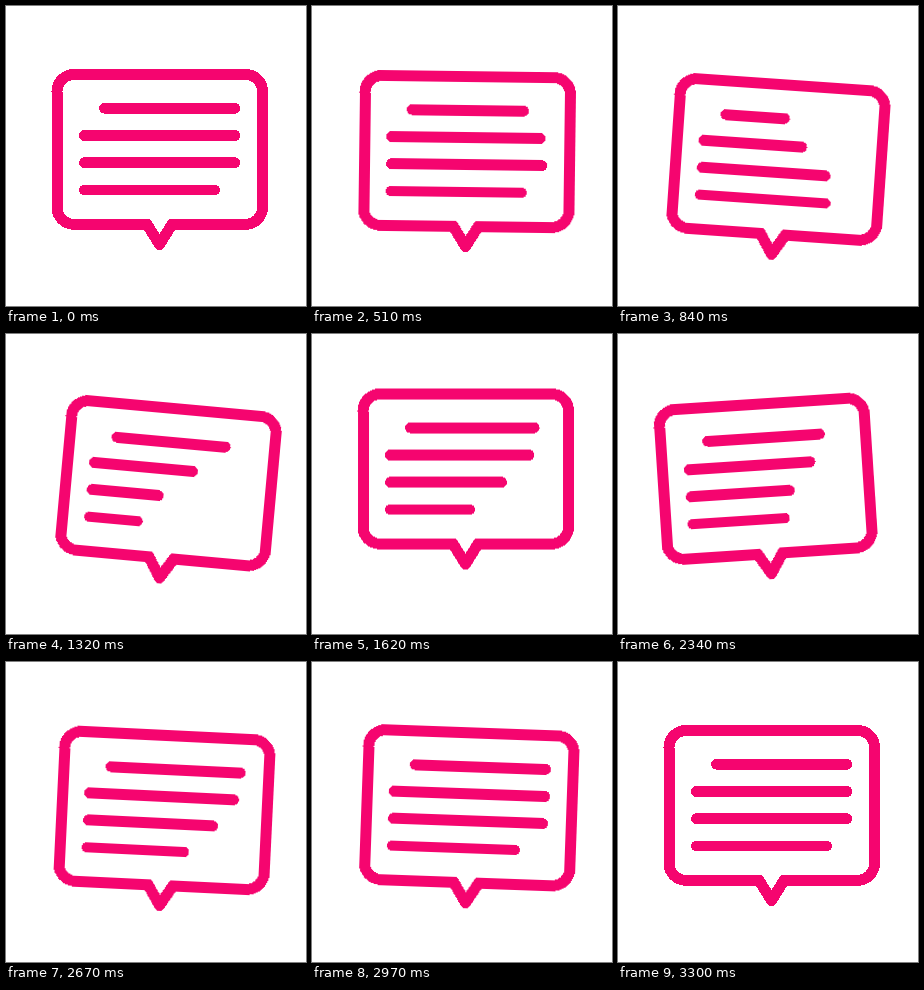
Recreate the animation shown at these times as an HTML page without scripts. Size 300x300 px, loop 3.6 s.

```html
<!DOCTYPE html>
<html lang="en">
<head>
<meta charset="utf-8">
<title>Speech bubble</title>
<style>
  html, body { margin: 0; width: 100%; height: 100%; overflow: hidden; background: #fff; }
  svg { display: block; width: 100vw; height: 100vh; shape-rendering: crispEdges; }

  .bob, .tilt, .text path {
    animation: 3.6s cubic-bezier(.37, 0, .63, 1) infinite;
  }
  .bob { animation-name: bob; }
  .tilt { animation-name: tilt; transform-origin: 153.5px 238.5px; }

  .ink { fill: none; stroke: #f5056f; stroke-width: 11; stroke-linecap: round; stroke-linejoin: round; }

  /* a growing dash offset pulls the right end of a line inwards */
  .text path { stroke-width: 10.8; }
  .text path:nth-child(1) { stroke-dasharray: 130.5 400; animation-name: line1; }
  .text path:nth-child(2) { stroke-dasharray: 150.5 400; animation-name: line2; }
  .text path:nth-child(3) { stroke-dasharray: 150.5 400; animation-name: line3; }
  .text path:nth-child(4) { stroke-dasharray: 130 400; animation-name: line4; }

  @keyframes bob {
    0%, 8.6% { transform: translateY(0); }
    29.3% { transform: translateY(12px); }
    50% { transform: translateY(-11.6px); }
    72.2% { transform: translateY(5px); }
    91.7%, 100% { transform: translateY(0); }
  }
  @keyframes tilt {
    0%, 8.6% { transform: rotate(0deg); }
    32.8% { transform: rotate(5.9deg); }
    58.3% { transform: rotate(-6.7deg); }
    76.4% { transform: rotate(3.1deg); }
    91.7%, 100% { transform: rotate(0deg); }
  }
  @keyframes line1 {
    0%, 8.6% { stroke-dashoffset: 0; }
    25% { stroke-dashoffset: 73.5px; }
    42.5% { stroke-dashoffset: 5px; }
    56.7% { stroke-dashoffset: 29.5px; }
    76.7%, 100% { stroke-dashoffset: 0; }
  }
  @keyframes line2 {
    0%, 12.3% { stroke-dashoffset: 0; }
    29.7% { stroke-dashoffset: 74.5px; }
    47.2% { stroke-dashoffset: 9.5px; }
    59.7% { stroke-dashoffset: 35.5px; }
    80%, 100% { stroke-dashoffset: 0; }
  }
  @keyframes line3 {
    0%, 15.9% { stroke-dashoffset: 0; }
    35.3% { stroke-dashoffset: 85.5px; }
    50.6% { stroke-dashoffset: 20.5px; }
    63.9% { stroke-dashoffset: 52.5px; }
    84.4%, 100% { stroke-dashoffset: 0; }
  }
  @keyframes line4 {
    0%, 20.6% { stroke-dashoffset: 0; }
    37.8% { stroke-dashoffset: 83px; }
    53.6% { stroke-dashoffset: 9px; }
    68.1% { stroke-dashoffset: 42px; }
    88.3%, 100% { stroke-dashoffset: 0; }
  }
</style>
</head>
<body>
<svg viewBox="0 0 300 300">
  <g class="bob">
    <g class="tilt ink">
      <path d="M141 218.3H68a17 17 0 0 1-17-17V85.5a17 17 0 0 1 17-17H239.5a17 17 0 0 1 17 17V201.3a17 17 0 0 1-17 17H166L153.5 238.5Z"/>
      <g class="text">
        <path d="M98.5 102.3h130.5"/>
        <path d="M78.5 129.5h150.5"/>
        <path d="M78.5 156.7h150.5"/>
        <path d="M78.5 184h130"/>
      </g>
    </g>
  </g>
</svg>
</body>
</html>
```
